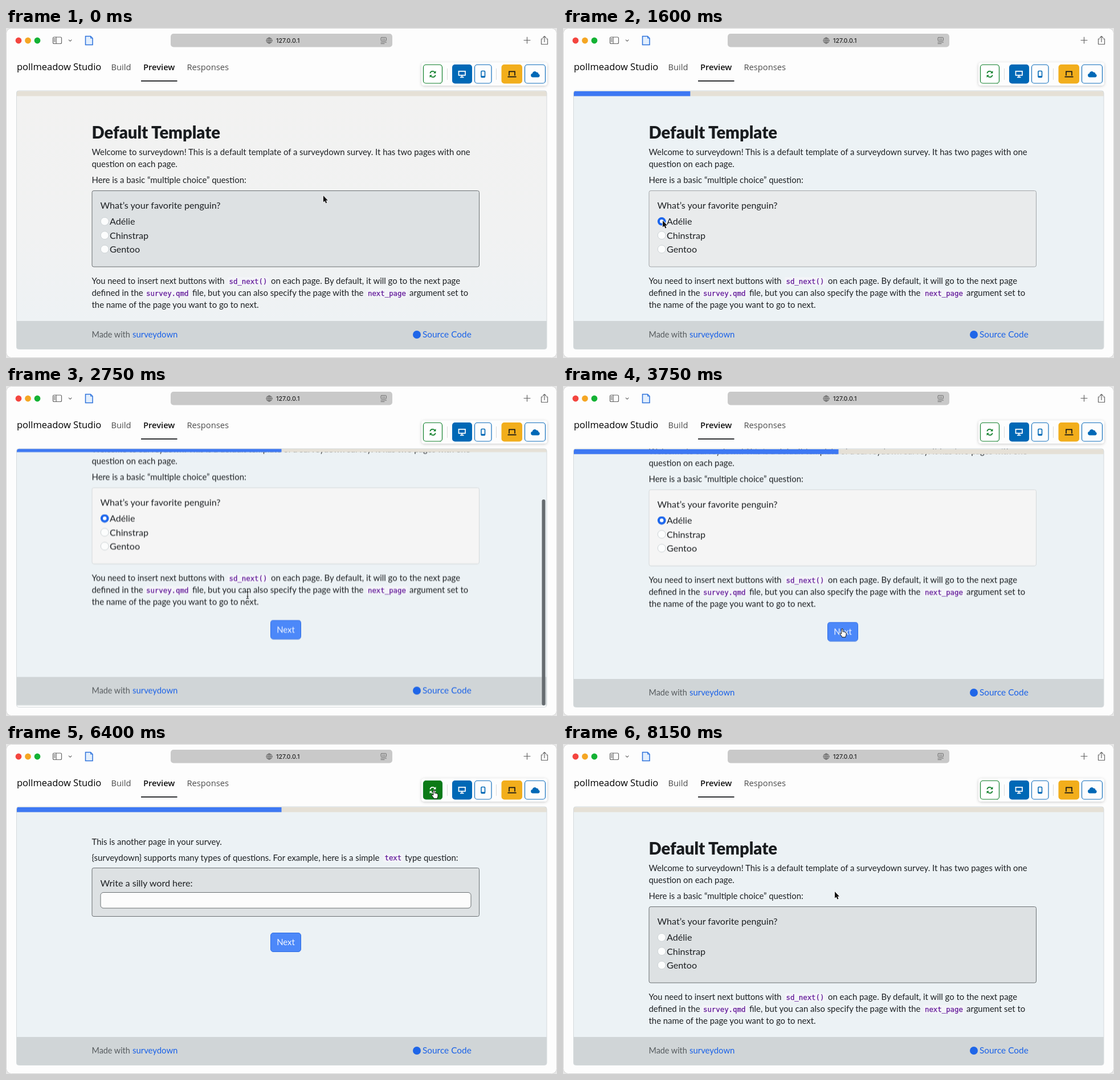
Write an HTML page that moves like this. It is 967 px wide and 579 px high and loops after 8.6 s.

```html
<!DOCTYPE html>
<html lang="en">
<head>
<meta charset="utf-8">
<title>Survey preview</title>
<style>
html, body { margin: 0; width: 100%; height: 100%; overflow: hidden; background: #e6e6e6; }
svg { display: block; }
text { font: 14.88px Lato, sans-serif; fill: #1d2023; white-space: pre; }
.ui { font: 14.7px "Open Sans", sans-serif; fill: #4c4c4c; }
.q { font-size: 16.1px; }
.mono { font: 12.35px "DejaVu Sans Mono", monospace; fill: #5d1296; stroke: #5d1296; stroke-width: .25; }
.code { fill: #f3f4f8; }
.link { fill: #1a62e8; }
.line { fill: none; stroke: #666; stroke-width: 1.2; stroke-linecap: round; stroke-linejoin: round; }
.box { fill: #dde1e3; stroke: #6b7073; }
.radio { fill: #fcfdfd; stroke: #cdd3d6; }

/* one shared 8.6 s clock; 1% = 86 ms */
.anim { animation: 8.6s linear infinite; }
.step { animation-timing-function: step-end; }

#cursor { animation-name: move; }
@keyframes move {
  0% { transform: translate(557px, 294px); }
  9.88% { transform: translate(357px, 317px); animation-timing-function: ease-out; }
  16.3%, 19.2% { transform: translate(175px, 338px); animation-timing-function: ease-in; }
  25.58% { transform: translate(309px, 348px); }
  31.98% { transform: translate(424px, 367px); animation-timing-function: ease-in-out; }
  37.2%, 48.8% { transform: translate(490px, 426px); animation-timing-function: ease-in; }
  55.81% { transform: translate(631px, 308px); animation-timing-function: ease-out; }
  65.1%, 87.6% { transform: translate(751px, 81px); animation-timing-function: ease-in-out; }
  94.7%, 100% { transform: translate(477px, 259px); }
}
#arrow { animation-name: arrow; }
@keyframes arrow {
  0%, 32.8%, 49.4%, 89.2% { opacity: 1; }
  30.8%, 35.5%, 61.6% { opacity: 0; }
  100% { opacity: 1; }
}
#beam { animation-name: beam; }
@keyframes beam { 0%, 32.8%, 100% { opacity: 0; } 30.8% { opacity: 1; } }
#hand { animation-name: hand; }
@keyframes hand { 0%, 49.4%, 89.2%, 100% { opacity: 0; } 35.5%, 61.6% { opacity: 1; } }

#first { animation-name: first; }
@keyframes first { 0%, 79.1%, 100% { opacity: 1; } 44.2% { opacity: 0; } }
#second { animation-name: second; }
@keyframes second { 0%, 79.1%, 100% { opacity: 0; } 44.2% { opacity: 1; } }

#picked { animation-name: picked; }
@keyframes picked { 0%, 44.2%, 100% { opacity: 0; } 17.4% { opacity: 1; } }
#choice { animation-name: answer; }
@keyframes answer {
  0%, 17.4%, 79%, 100% { fill: #dde1e3; stroke: #6b7073; }
  19.8%, 44.2% { fill: #f5f5f5; stroke: #d5d9db; }
}
#bar { animation-name: bar; }
@keyframes bar {
  0%, 17.4% { width: 0; animation-timing-function: ease; }
  22%, 79.09% { width: 464.5px; }
  79.1%, 100% { width: 0; }
}

#scroll { animation-name: scroll; }
@keyframes scroll {
  0%, 26.7% { transform: translateY(0); animation-timing-function: ease-in-out; }
  31%, 79% { transform: translateY(-103.5px); }
  79.1%, 100% { transform: translateY(0); }
}
#bounce { animation-name: bounce; }
@keyframes bounce {
  0%, 31%, 34.5%, 100% { transform: translateY(0); }
  31.9%, 32.2% { transform: translateY(-3.5px); }
}
#thumb { animation-name: thumb; }
@keyframes thumb {
  0%, 26.6% { transform: translateY(-85px); opacity: 0; }
  26.7% { transform: translateY(-85px); opacity: 1; animation-timing-function: ease-in-out; }
  31%, 38% { transform: translateY(0); opacity: 1; }
  41%, 100% { transform: translateY(0); opacity: 0; }
}

#refresh { animation-name: refresh; }
@keyframes refresh {
  0%, 89.2%, 100% { fill: #fff; color: #12802c; }
  61.6% { fill: #0b7a16; color: #fff; }
}
#tint { animation-name: tint; }
@keyframes tint { 0%, .6% { opacity: 1; } 4.5%, 100% { opacity: 0; } }
</style>
</head>
<body>
<svg width="967" height="579" viewBox="0 0 967 579">
  <defs>
    <clipPath id="view"><rect x="18.5" y="110" width="930.5" height="453.5" rx="4"/></clipPath>
    <linearGradient id="warm" x2="0" y2="1">
      <stop offset="0" stop-color="#f2f2f1"/>
      <stop offset=".55" stop-color="#f1f2f2"/>
      <stop offset="1" stop-color="#edf2f5"/>
    </linearGradient>
    <filter id="soft" x="-10%" y="-40%" width="120%" height="180%">
      <feDropShadow dx="0" dy="1" stdDeviation="2.5" flood-opacity=".2"/>
    </filter>
    <g id="next">
      <rect x="464.5" y="331.5" width="53" height="33" rx="4.5" fill="#4c88f9" stroke="#2f6de2"/>
      <text x="491" y="353" text-anchor="middle" style="fill:#f4f8ff">Next</text>
    </g>
  </defs>

  <rect x=".5" y=".5" width="966" height="578" rx="9" fill="#fdfdfd" stroke="#d6d6d6"/>

  <!-- browser toolbar -->
  <circle cx="22" cy="22" r="5.4" fill="#f4453f"/>
  <circle cx="38.5" cy="22" r="5.4" fill="#f5a623"/>
  <circle cx="55" cy="22" r="5.4" fill="#14b234"/>
  <g class="line">
    <rect x="82.5" y="16" width="15" height="11.5" rx="2"/>
    <path d="M88 16v11.5M84.3 18.8h1.8M84.3 21h1.8M84.3 23.2h1.8M110.3 20.8l2.3 2.3 2.3-2.3"/>
  </g>
  <path d="M139.5 14.5h9l3.5 3.5v11.5h-12.5z" fill="#e3effd" stroke="#2d72dc" stroke-width="1.5"/>
  <path d="M148.5 14.5v3.5h3.5" fill="none" stroke="#2d72dc"/>
  <rect x="289" y="10" width="389" height="23.5" rx="5" fill="#c9c9c9"/>
  <g class="line" style="stroke-width:.9">
    <circle cx="462" cy="22" r="5"/>
    <ellipse cx="462" cy="22" rx="2.3" ry="5"/>
    <path d="M457 22h10M458 19h8M458 25h8M462 17v10"/>
    <rect x="658" y="16.5" width="9.5" height="6" rx="1.2"/>
    <path d="M660 19.5h5.5M658 25h9.5M658 27.5h6"/>
  </g>
  <text x="474" y="26" style="font:500 10.6px Inter,sans-serif;fill:#222">127.0.0.1</text>
  <path class="line" d="M909 21.5h11M914.5 16v11M942 19h-2.500v9.500h11v-9.500h-2.500M945 24.500v-10M942.300 17l2.700-2.700 2.700 2.700"/>

  <!-- app navigation -->
  <text class="ui" x="19" y="74" style="font-size:16.5px;font-weight:500;fill:#000">pollmeadow Studio</text>
  <text class="ui" x="184.5" y="73.5">Build</text>
  <text class="ui" x="241" y="73.5" style="font-weight:600;fill:#111">Preview</text>
  <text class="ui" x="317.5" y="73.5">Responses</text>
  <rect x="237" y="92" width="63.5" height="1.8" fill="#1b1d20"/>

  <rect x="729" y="60.5" width="221" height="40.5" rx="5" fill="#fdfdfd" filter="url(#soft)"/>
  <path d="M774.5 71v20M860.5 71v20" stroke="#dcdcdc"/>
  <g id="refresh" class="anim step">
    <rect x="732.5" y="64.5" width="33" height="32.5" rx="4.5" stroke="#12802c" stroke-width="1.2"/>
    <g fill="none" stroke="currentColor" stroke-width="1.7">
      <path d="M744.3 79.5a4.7 4.7 0 0 1 8.2-2M753.7 82.5a4.7 4.7 0 0 1-8.2 2"/>
    </g>
    <path d="M754.4 75v4.5h-4.5zM743.6 87v-4.5h4.5z" style="fill:currentColor"/>
  </g>
  <rect x="783" y="64" width="35" height="33.5" rx="5" fill="#0068b6"/>
  <path d="M794.5 75.8h11.5v7h-11.5zM800.2 83v3M797 86.3h6.5" fill="none" stroke="#fff" stroke-width="1.7"/>
  <g fill="#fdfdfd" stroke="#1470bd" stroke-width="1.2">
    <rect x="822.5" y="64.5" width="29.5" height="32.5" rx="4.5"/>
    <rect x="910.5" y="64.5" width="36" height="32.5" rx="4.5"/>
  </g>
  <rect x="834" y="75.5" width="6.5" height="11" rx="1.2" fill="none" stroke="#0068b6" stroke-width="1.6"/>
  <path d="M834 85h6.5" stroke="#0068b6" stroke-width="1.8"/>
  <rect x="869.5" y="64" width="36.5" height="33.5" rx="5" fill="#f2ae1c"/>
  <path d="M883 83.5v-7.2h10v7.2M880.5 85.700h15" fill="none" stroke="#161616" stroke-width="1.7"/>
  <path d="M924.5 86.5a3.4 3.4 0 0 1-.8-6.7 4.2 4.2 0 0 1 7.6-2 3 3 0 0 1 3.2 3 2.900 2.900 0 0 1-.8 5.700z" fill="#0068b6"/>

  <!-- survey page -->
  <g clip-path="url(#view)">
    <rect x="18" y="110" width="932" height="454" fill="#fff"/>
    <g id="bounce" class="anim">
      <rect x="18" y="110" width="932" height="453.5" fill="#ecf2f5"/>
      <rect id="tint" class="anim" x="18" y="110" width="932" height="453.5" fill="url(#warm)"/>

      <g id="first" class="anim step">
        <g id="scroll" class="anim">
          <text x="150.5" y="194" style="font-size:29.2px;font-weight:900;fill:#191c1f">Default Template</text>
          <text x="150.5" y="223">Welcome to surveydown! This is a default template of a surveydown survey. It has two pages with one</text>
          <text x="150.5" y="244">question on each page.</text>
          <text x="150.5" y="272">Here is a basic “multiple choice” question:</text>

          <rect id="choice" class="box anim" x="151" y="285.5" width="679.5" height="133.5" rx="3"/>
          <text class="q" x="165.5" y="317">What’s your favorite penguin?</text>
          <g class="radio">
            <circle cx="173.2" cy="339.3" r="7"/>
            <circle cx="173.2" cy="363.7" r="7"/>
            <circle cx="173.2" cy="388" r="7"/>
          </g>
          <g id="picked" class="anim step">
            <circle cx="173.2" cy="339.3" r="7.3" fill="#1c66ee"/>
            <circle cx="173.2" cy="339.3" r="3.2" fill="#fff"/>
          </g>
          <text class="q" x="182" y="345">Adélie</text>
          <text class="q" x="182" y="369.5">Chinstrap</text>
          <text class="q" x="182" y="394">Gentoo</text>

          <g class="code">
            <rect x="389" y="437" width="73" height="15" rx="3"/>
            <rect x="243" y="458" width="81" height="15" rx="3"/>
            <rect x="632" y="458" width="73" height="15" rx="3"/>
          </g>
          <text x="150.5" y="449" style="font-size:14.6px">You need to insert next buttons with</text>
          <text class="mono" x="391.5" y="449">sd_next()</text>
          <text x="465" y="449">on each page. By default, it will go to the next page</text>
          <text x="150.5" y="470">defined in the</text>
          <text class="mono" x="246" y="470">survey.qmd</text>
          <text x="327" y="470">file, but you can also specify the page with the</text>
          <text class="mono" x="635" y="470">next_page</text>
          <text x="708" y="470">argument set to</text>
          <text x="150.5" y="491">the name of the page you want to go to next.</text>
          <use href="#next" y="186.5"/>
        </g>
      </g>

      <g id="second" class="anim step">
        <text x="150.5" y="176.5">This is another page in your survey.</text>
        <text x="150.5" y="204.5">{surveydown} supports many types of questions. For example, here is a simple</text>
        <rect class="code" x="662" y="192" width="35" height="15" rx="3"/>
        <text class="mono" x="664.5" y="204">text</text>
        <text x="700" y="204.5">type question:</text>
        <rect class="box" x="151" y="217.5" width="679.5" height="85" rx="3"/>
        <text class="q" x="165.5" y="249.5">Write a silly word here:</text>
        <rect x="166" y="260.5" width="650" height="27.5" rx="5" fill="#fcfcfc" stroke="#6b7073"/>
        <use href="#next"/>
      </g>

      <rect x="18" y="111" width="932" height="8.5" fill="#e5e0d6"/>
      <rect id="bar" class="anim" x="19" y="111" width="0" height="8.5" fill="#3d78f3"/>

      <rect x="18" y="514" width="932" height="49.5" fill="#d0d5d7"/>
      <text x="150.5" y="543" style="font-size:14.4px;fill:#565b5e">Made with</text>
      <text class="link" x="222" y="543">surveydown</text>
      <circle cx="721" cy="538" r="7" fill="#1f66e8"/>
      <text class="link" x="731" y="543" style="font-size:15.4px">Source Code</text>
    </g>
    <rect id="thumb" class="anim" x="940.5" y="199" width="6" height="361.5" rx="3" fill="#666c70"/>
  </g>
  <rect x="18.5" y="110" width="930.5" height="453.5" rx="4" fill="none" stroke="#d5dadc"/>

  <!-- pointer: each shape has its hot spot at 0,0 -->
  <g id="cursor" class="anim" stroke-linejoin="round">
    <path id="arrow" class="anim step" d="M0 0v11.5l2.6-2.3 1.9 4.3 2-.9-1.9-4.2h3.5z" fill="#111" stroke="#fff" stroke-width="1.6" paint-order="stroke"/>
    <g id="beam" class="anim step" fill="none" stroke="#222" stroke-width="1.1">
      <path d="M-2.5-6q2.5 0 2.5 1.5v9q0 1.5-2.5 1.5M2.5-6q-2.5 0-2.5 1.5M2.5 6q-2.5 0-2.5-1.5M-1.5 2h3"/>
    </g>
    <path id="hand" class="anim step" d="M-1.2 1a1.2 1.2 0 0 1 2.4 0v4.2q1.5-.7 2 .4 1.5-.5 1.9.6 1.9-.3 1.9 1.4v3q0 1.5-1.1 2.9v1.3h-6q-.7-2-2.3-3.7l-1.6-2.3q-.2-1.5 1.3-1.1l1.5 1.2z" fill="#fff" stroke="#111"/>
  </g>
</svg>
</body>
</html>
```
